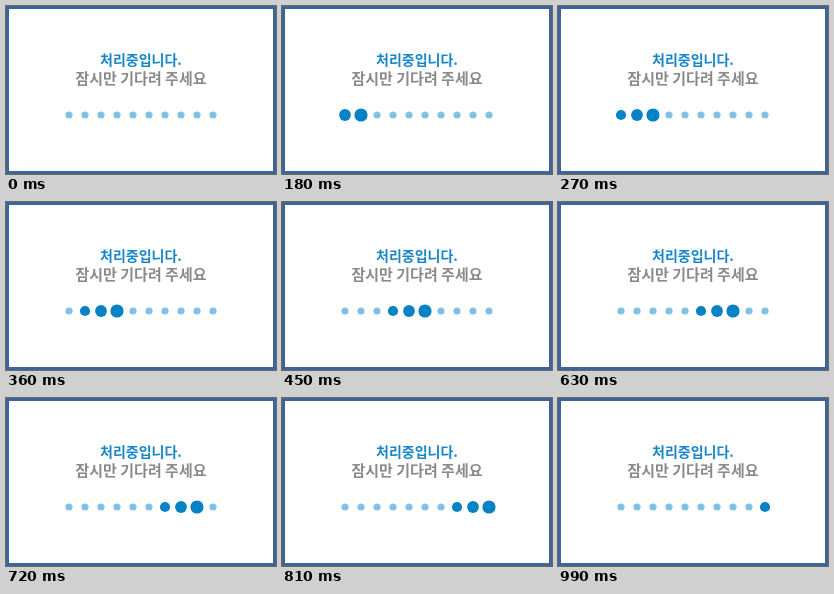
An HTML page with a canvas that plays this animation: 270 px wide and 168 px high, repeating every 1.17 s.

```html
<!DOCTYPE html>
<html lang="ko">
<head>
<meta charset="utf-8">
<title>처리중입니다</title>
<style>
html, body { margin: 0; width: 100%; height: 100%; overflow: hidden; background: #fff; }
canvas { display: block; width: 270px; height: 168px; }
</style>
</head>
<body>
<canvas id="stage"></canvas>
<script>
const W = 270, H = 168, LOOP = 1170, STEP = 90;
const DOTS = 10, GAP = 16, X0 = 63, Y0 = 109;
const SIZES = [6.6, 5.9, 5.1];
const FONT = '"Noto Sans CJK KR", "Noto Sans CJK", sans-serif';

const canvas = document.getElementById('stage');
const ctx = canvas.getContext('2d');
const dpr = window.devicePixelRatio || 1;
canvas.width = W * dpr;
canvas.height = H * dpr;
ctx.scale(dpr, dpr);

function label(text, y, size, color) {
  ctx.font = `700 ${size}px ${FONT}`;
  ctx.fillStyle = color;
  ctx.fillText(text, W / 2, y);
}

function dot(i, r, color) {
  ctx.fillStyle = color;
  ctx.beginPath();
  ctx.arc(X0 + GAP * i, Y0, r, 0, Math.PI * 2);
  ctx.fill();
}

// The wave enters from the left and jumps over one dot midway.
function headAt(ms) {
  const step = Math.min(11, Math.floor(ms / STEP));
  return step < 5 ? step - 1 : step;
}

function draw(now) {
  const head = headAt(now % LOOP);
  ctx.fillStyle = '#fff';
  ctx.fillRect(0, 0, W, H);
  ctx.strokeStyle = '#3d6599';
  ctx.lineWidth = 3;
  ctx.strokeRect(1.5, 1.5, W - 3, H - 3);

  ctx.textAlign = 'center';
  label('처리중입니다.', 59, 14, '#1686c9');
  label('잠시만 기다려 주세요', 78, 15, '#8a8a8a');

  for (let i = 0; i < DOTS; i++) {
    const size = head < 0 ? undefined : SIZES[head - i];
    if (size) dot(i, size, '#0783c5');
    else dot(i, 3.6, '#83c0e3');
  }
  requestAnimationFrame(draw);
}
requestAnimationFrame(draw);
</script>
</body>
</html>
```
